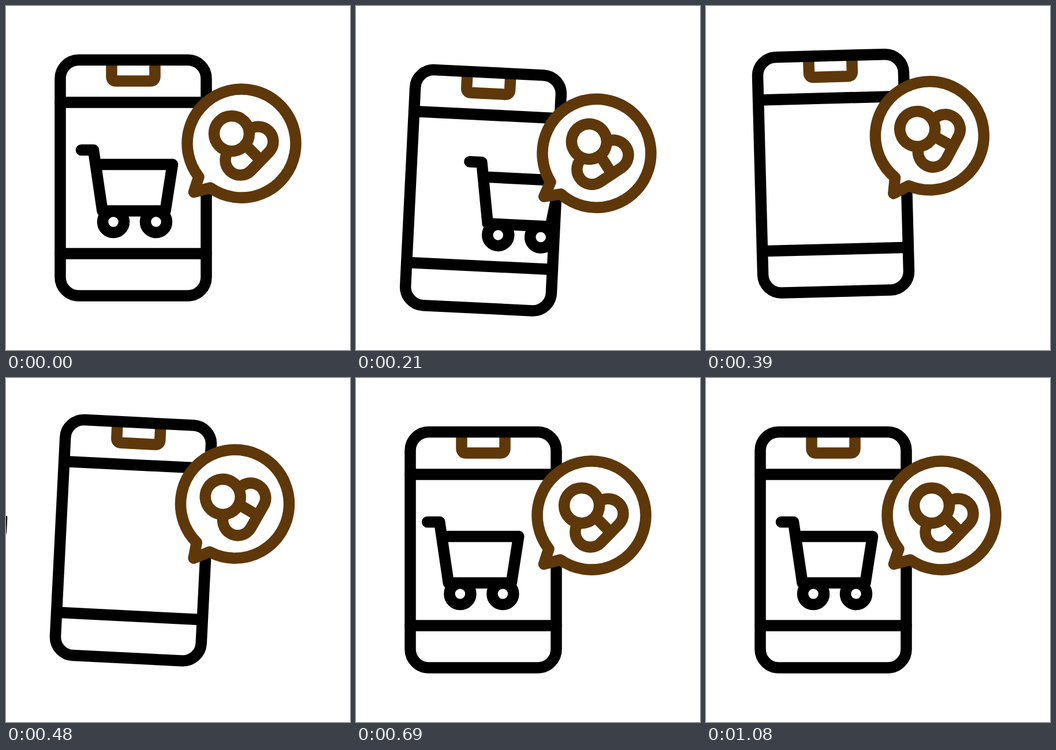
Animation of 596x596 px, one loop 1.26 s. Source, as an HTML page:

```html
<!DOCTYPE html>
<html lang="en">
<head>
<meta charset="utf-8">
<title>Mobile shopping</title>
<style>
  html, body { margin: 0; height: 100%; overflow: hidden; background: #fff; }
  svg { display: block; width: 100vw; height: 100vh; }
  svg * { stroke-width: 19.5; stroke-linecap: round; stroke-linejoin: round; }
  .black { stroke: #000; }
  .brown { stroke: #5e380a; }
</style>
</head>
<body>
<svg viewBox="0 0 596 596" fill="none">
  <clipPath id="screen">
    <rect x="94" y="94" width="253" height="408"/>
    <rect x="-60" y="94" width="60.6" height="408"/>
  </clipPath>

  <g id="phone" class="black">
    <path class="brown" d="M183 100V122Q183 130 191 130H250Q258 130 258 122V100"/>
    <g clip-path="url(#screen)">
      <path id="basket" d="M130.5 249.5H151.5L167 355H276L288.5 274.5H158"/>
      <g id="wheels" fill="#fff">
        <circle cx="186" cy="374" r="18.5"/>
        <circle cx="260" cy="374" r="18.5"/>
      </g>
    </g>
    <path d="M94 167H347M94 429H347"/>
    <rect x="94" y="93.5" width="253" height="408.5" rx="32"/>
  </g>

  <g id="bubble" class="brown" fill="#fff">
    <path d="M334 296A94 94 0 1 1 354 315L325.5 322.5Z"/>
    <g id="pills">
      <rect x="373.2" y="225" width="96.6" height="52" rx="26" transform="rotate(-46 421.5 251)"/>
      <path d="M405 231L439 265"/>
      <circle cx="391" cy="221" r="30.5"/>
    </g>
  </g>
</svg>
<script>
const LOOP = 1260, STEP = 30;
const clamp = u => Math.min(1, Math.max(0, u));
const ease = u => (1 - Math.cos(Math.PI * clamp(u))) / 2;
const place = (id, transform) => document.getElementById(id).setAttribute('transform', transform);

// Swing from rest through each peak, one per beat, then settle back to rest
function swing(t, start, beat, settle, ...peaks) {
  const end = start + beat * peaks.length;
  let value = 0;
  peaks.forEach((peak, i) => {
    value += (peak - (peaks[i - 1] ?? 0)) * ease((t - start - i * beat) / beat);
  });
  return value - peaks.at(-1) * ease((t - end) / settle);
}

// The cart speeds off to the right, then rolls in from the left
function cartX(t) {
  if (t < 405) return 64 * (Math.max(0, t - 30) / 180) ** 2.2;
  return -78 * (Math.max(0, 720 - t) / 120) ** 1.9;
}

function draw(now) {
  const t = Math.floor(now % LOOP / STEP) * STEP;
  const x = cartX(t);
  const sway = swing(t, 360, 240, 240, -7, 12);
  const phoneY = swing(t, 30, 215, 170, 23, -17);
  const phoneTurn = swing(t, 30, 155, 155, 3.2, -2.9, 3);
  const bubbleY = swing(t, 90, 210, 180, 12, -11);
  const bubbleTurn = swing(t, 30, 165, 260, 6.6, -12.8);
  const pillTurn = swing(t, 100, 175, 80, 8.5, -8, 4.5);

  place('phone', `translate(0 ${phoneY}) rotate(${phoneTurn} 220.5 298)`);
  place('wheels', `translate(${x} 0)`);
  place('basket', `translate(${x + sway} 0)`);
  place('bubble', `translate(0 ${bubbleY}) rotate(${bubbleTurn} 322 325)`);
  place('pills', `rotate(${pillTurn} 408.5 238.5)`);
}

let start;
function tick(now) {
  start ??= now;
  draw(now - start);
  requestAnimationFrame(tick);
}
draw(0);
requestAnimationFrame(tick);
</script>
</body>
</html>
```
